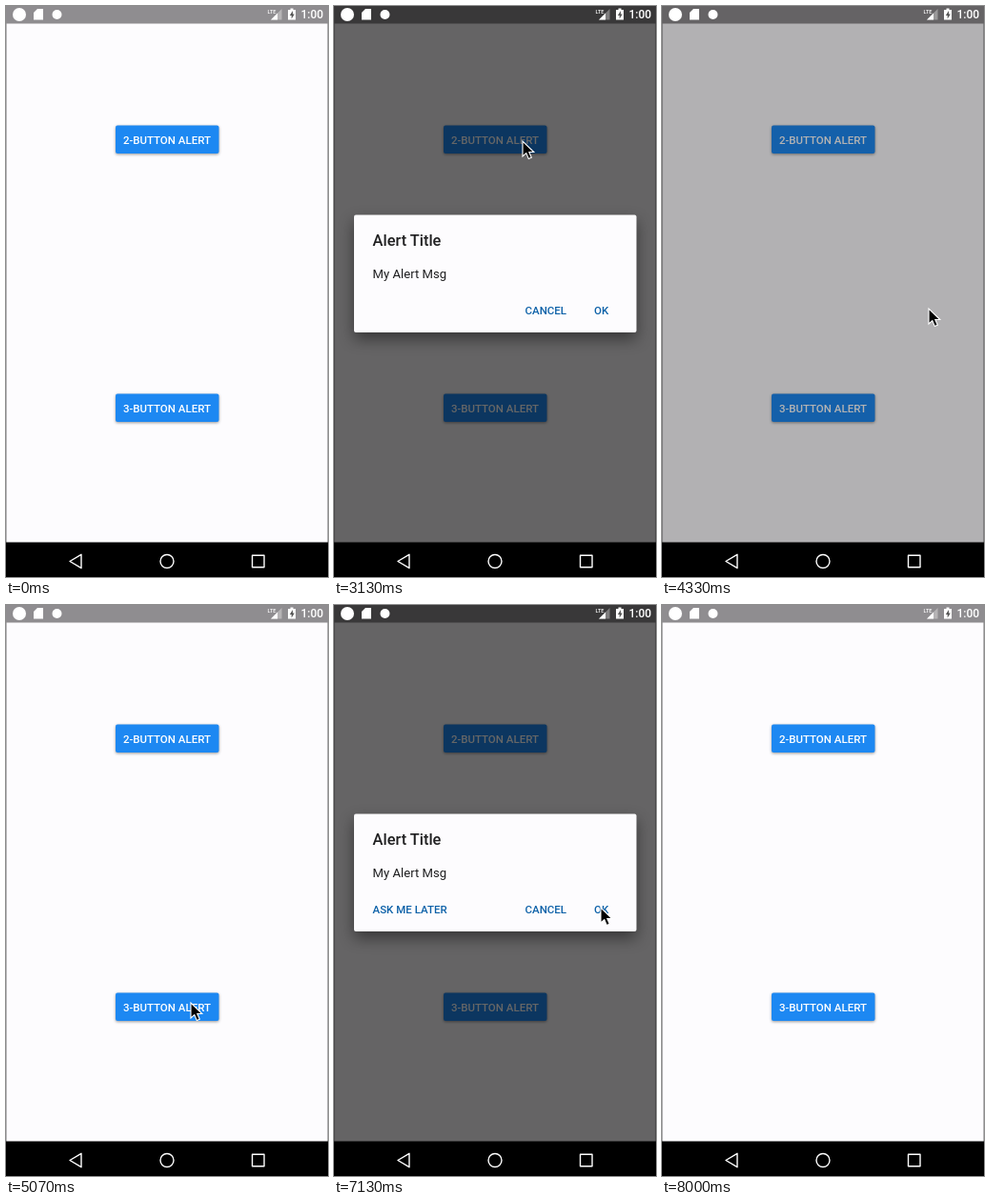
These frames come from a looping animation (338x600 px, 8.07 s). An HTML page:

```html
<!DOCTYPE html>
<html lang="en">
<head>
<meta charset="utf-8">
<title>Alert demo</title>
<style>
  html, body { margin: 0; width: 100%; height: 100%; overflow: hidden; background: #000; }
  svg { display: block; width: 338px; height: 600px; font: 500 11.5px Roboto, sans-serif; }
  .button { fill: #1d88f2; filter: drop-shadow(0 1.5px 1.5px rgba(0, 0, 0, .4)); }
  .label { fill: #fff; text-anchor: middle; }
  .panel { fill: #fdfcfe; filter: drop-shadow(0 7px 8px rgba(0, 0, 0, .45)); }
  .action { fill: #0d61a8; }
  .nav { fill: none; stroke: #fff; stroke-width: 1.4; stroke-linejoin: round; }
</style>
</head>
<body>
<svg viewBox="0 0 338 600">
  <rect width="338" height="564" fill="#fdfcfe"/>
  <path d="M.5 18V564M337.5 18V564" stroke="#b9b8ba"/>
  <rect width="338" height="18.5" fill="#8f8d90"/>

  <rect class="button" x="115" y="125.5" width="108.5" height="29.5" rx="2"/>
  <text class="label" x="169" y="145">2-BUTTON ALERT</text>
  <rect class="button" x="115" y="407.5" width="108.5" height="29.5" rx="2"/>
  <text class="label" x="169" y="427">3-BUTTON ALERT</text>

  <rect id="dim" width="338" height="564" opacity="0"/>

  <!-- status bar -->
  <g fill="#fff">
    <circle cx="14" cy="9" r="7"/>
    <path d="M33 3H39V14.5H29V7Z"/>
    <circle cx="53.5" cy="9" r="5"/>
    <text x="274.5" y="8" font-size="5.5">LTE</text>
    <path d="M289.5 3V14.5H278Z" opacity=".35"/>
    <path d="M285 7.5V14.5H278Z"/>
    <path d="M298.5 2.5H301.5V4H304V14.5H296V4H298.5Z"/>
    <path d="M301 5L297.8 10H299.7V13.5L302.8 8.5H301Z" fill="#555"/>
    <text x="309.5" y="13.3" font-size="12">1:00</text>
  </g>

  <g id="dialog" opacity="0">
    <rect class="panel" x="21" y="219.5" width="296.5" height="123.5" rx="2"/>
    <text x="40.5" y="252" font-size="16.45" fill="#1f1f20">Alert Title</text>
    <text x="40.5" y="286" font-size="13.15" font-weight="400" fill="#1f1f20">My Alert Msg</text>
    <g class="action">
      <text id="later" x="40.5" y="324">ASK ME LATER</text>
      <text x="200.5" y="324">CANCEL</text>
      <text x="273" y="324">OK</text>
    </g>
  </g>

  <rect y="563.5" width="338" height="36.5"/>
  <g class="nav">
    <path d="M67 583.5L79 576.3V590.7Z"/>
    <circle cx="169" cy="583.5" r="7"/>
    <rect x="258.5" y="577.3" width="12.5" height="12.5"/>
  </g>

  <path id="cursor" d="M0 0V16L3.8 12.6L6.3 18.6L9.3 17.3L6.8 11.5H11.8Z" stroke="#fff" stroke-width="1.1"/>
</svg>
<script>
const LOOP = 8070;
const [dim, dialog, later, cursor] =
  ['dim', 'dialog', 'later', 'cursor'].map(id => document.getElementById(id));

// pointer stops: time, x, y
const stops = [
  [1265, 279, 126], [1470, 234, 138], [1640, 234, 139], [1730, 241, 146],
  [1960, 241, 146], [2395, 198, 142], [3130, 198, 142], [3670, 280, 318],
  [4550, 280, 318], [5065, 194, 418], [6240, 194, 418], [6800, 280, 318],
  [7320, 280, 318], [7450, 338, 300]
];
const alerts = [
  { open: 2850, close: 4130, three: false },
  { open: 5980, close: 7270, three: true }
];

const ramp = (t, from, to) => Math.min(1, Math.max(0, (t - from) / (to - from)));
const smooth = u => u * u * (3 - 2 * u);

function drawCursor(t) {
  const i = stops.findIndex(s => s[0] > t);
  cursor.style.display = i > 0 ? '' : 'none';
  if (i < 1) return;
  const [t0, x0, y0] = stops[i - 1], [t1, x1, y1] = stops[i];
  const u = smooth(ramp(t, t0, t1));
  cursor.setAttribute('transform', `translate(${x0 + (x1 - x0) * u} ${y0 + (y1 - y0) * u})`);
}

function drawAlert(t) {
  const { open, close, three } = alerts[t < 5500 ? 0 : 1];
  const shown = ramp(t, open, open + 140);
  const scale = 0.9 + 0.1 * smooth(shown);
  dim.setAttribute('opacity', 0.6 * shown * (1 - ramp(t, close + 70, close + 330)));
  dialog.setAttribute('opacity', shown * (1 - ramp(t, close, close + 200)));
  dialog.setAttribute('transform', `translate(169 281) scale(${scale}) translate(-169 -281)`);
  later.style.display = three ? '' : 'none';
}

const start = performance.now();
function frame() {
  const t = (performance.now() - start) % LOOP;
  drawAlert(t);
  drawCursor(t);
  requestAnimationFrame(frame);
}
frame();
</script>
</body>
</html>
```
